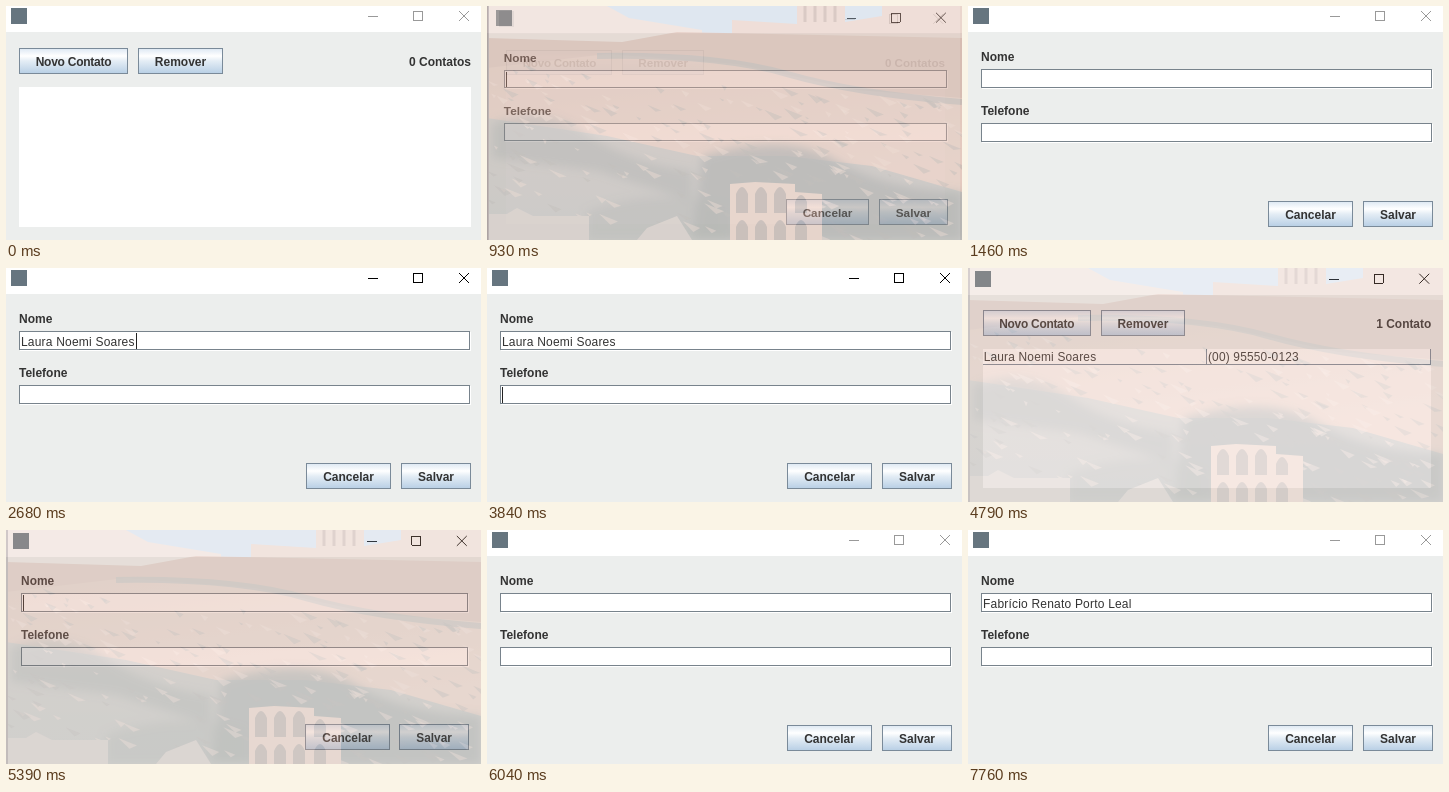
An HTML page that plays this animation: 475x234 px, repeating every 8000 ms.

```html
<!DOCTYPE html>
<html lang="pt-BR">
<head>
<meta charset="utf-8">
<title>Contatos</title>
<style>
  html, body { margin: 0; width: 100%; height: 100%; overflow: hidden; background: #eceeed; }
  svg { display: block; width: 475px; height: 234px; }
  text { font: 12px "Liberation Sans", Arial, sans-serif; letter-spacing: .2px; fill: #333; white-space: pre; }
  .b { font-weight: bold; letter-spacing: 0; }
  .tight { letter-spacing: -.25px; }
  .mid { text-anchor: middle; }
  .end { text-anchor: end; }
  .win { transform-origin: 230px 106px; }
  .ctl { fill: none; stroke: #999; }
  .active .ctl { stroke: #000; }
  .crisp { shape-rendering: crispEdges; }
</style>
</head>
<body>
<svg id="stage" viewBox="0 0 475 234">
  <defs>
    <linearGradient id="btn" x2="0" y2="1">
      <stop offset="0" stop-color="#dde8f3"/>
      <stop offset=".3" stop-color="#fff"/>
      <stop offset=".5" stop-color="#e4edf5"/>
      <stop offset="1" stop-color="#b8cfe5"/>
    </linearGradient>
    <linearGradient id="rock" x2=".4" y2="1">
      <stop offset="0" stop-color="#c88a72"/>
      <stop offset="1" stop-color="#dc9f87"/>
    </linearGradient>
    <linearGradient id="ground" x2="0" y2="1">
      <stop offset="0" stop-color="#b08c7d"/>
      <stop offset="1" stop-color="#8d8680"/>
    </linearGradient>
    <filter id="soft"><feGaussianBlur stdDeviation="5"/></filter>
  </defs>
  <g id="wall">
    <rect width="475" height="234" fill="url(#ground)"/>
    <rect width="475" height="40" fill="#a3b9d4"/>
    <path d="M0 0H120L142 12L215 24V40H0Z" fill="#d9b8aa"/>
    <path d="M245 30V14L310 18V0H358V16L395 10V0H475V40H245Z" fill="#d0a28f"/>
    <path d="M318 0V16M328 0V16M338 0V16M348 0V16" stroke="#94685a" stroke-width="3"/>
    <path d="M0 32L135 36L190 26L475 32V100H0Z" fill="#bd7f69"/>
    <path d="M0 62L120 48L250 58L370 84L475 92V186L385 160L300 150L210 150L120 130L0 112Z" fill="url(#rock)"/>
    <path d="M110 50Q230 48 300 68T475 96" fill="none" stroke="#756b67" stroke-width="6" opacity=".6"/>
    <g fill="#55534f" filter="url(#soft)">
      <path d="M215 150Q300 125 350 155T475 186V234H205Z" opacity=".75"/>
      <path d="M5 118Q55 98 100 128T205 165V195L110 165L5 152Z" opacity=".55"/>
      <path d="M100 205Q170 180 240 200V234H100Z" opacity=".4"/>
    </g>
    <g id="specks"></g>
    <path d="M0 208H20L30 202L46 210H102V234H0ZM160 222L190 210L205 234H150Z" fill="#b59d92"/>
    <path d="M243 234V178L268 176L308 178V186L335 188V234Z" fill="#dda58e"/>
    <path id="arches" fill="#8a6a5f"/>
    <rect width="2" height="234" fill="#5f4545"/>
  </g>
  <g id="wins"></g>
</svg>
<script>
const LOOP = 8000;
const CONTACT = 'Laura Noemi Soares', SECOND = 'Fabrício Renato Porto Leal', PHONE = '(00) 95550-0123';
const $ = id => document.getElementById(id);

const rect = (x, y, w, h, fill, extra = '') =>
  `<rect class="crisp" x="${x}" y="${y}" width="${w}" height="${h}" fill="${fill}" ${extra}/>`;
const text = (x, y, s, cls = '', id = '') =>
  `<text x="${x}" y="${y}" class="${cls}" ${id && `id="${id}"`}>${s}</text>`;
const button = (x, y, w, label, cls = '') =>
  rect(x + .5, y + .5, w - 1, 25, 'url(#btn)', `stroke="#7a8a99" id="${label}"`) +
  text(x + w / 2, y + 18, label, 'b mid ' + cls);
const field = (y, label, id) =>
  text(13, y - 8, label, 'b') + rect(14, y + 1, 451, 19, '#fff') +
  rect(13.5, y + .5, 450, 18, '#fff', 'stroke="#78838c"') + text(15, y + 15, '', '', id);
// The window reaches a little past the visible stage
const frame = (id, body) => `<g class="win" id="${id}">
  ${rect(-6, 26, 487, 214, '#eceeed')}${rect(-6, -6, 487, 32, '#fff')}${rect(5, 2, 16, 16, '#66757f')}
  <path class="ctl crisp" d="M362 10.5H372M407.5 5.5H416.5V14.5H407.5Z"/>
  <path class="ctl" d="M453 5L463 15M463 5L453 15"/>${body}</g>`;

$('wins').innerHTML =
  frame('form',
    field(63, 'Nome', 'name') + field(117, 'Telefone', 'phone') +
    button(300, 195, 85, 'Cancelar') + button(395, 195, 70, 'Salvar') +
    rect(0, 0, 1, 16, '#222', 'id="caret"')) +
  frame('list',
    button(13, 42, 109, 'Novo Contato', 'tight') + button(132, 42, 85, 'Remover') +
    text(465, 60, '', 'b end', 'count') + rect(13, 81, 452, 140, '#fff') +
    `<g id="row">${text(14, 93, CONTACT)}${text(240, 93, PHONE)}
      <path class="crisp" fill="none" d="M13 96.5H465M238.5 81V97M464.5 81V97" stroke="#7a8a99"/></g>`);

// Wallpaper details: rock cracks and scrub that follow the slope
let seed = 7;
const rnd = () => (seed = seed * 16807 % 2147483647) / 2147483647;
let specks = '';
for (let i = 0; i < 260; i++) {
  const x = rnd() * 470, y = 55 + rnd() * 150 + x * .08, w = 4 + rnd() * 16;
  const fill = i % 2 ? '#e9b9a4' : '#6f625c';
  specks += `<path d="M${x} ${y}l${w} ${w * .4}l${-w * .4} ${1 + rnd() * 3}z" fill="${fill}" opacity=".45"/>`;
}
$('specks').innerHTML = specks;
$('arches').setAttribute('d', [249, 268, 287, 308].map((x, i) => {
  const y = i < 3 ? 188 : 196;
  return `M${x} 207V${y}q6 -14 12 0V207ZM${x} 234V221q6 -14 12 0V234Z`;
}).join(''));

// Hard changes: [time, value]
const ACTIVE = [[0, 0], [750, 1], [1460, 0], [2530, 1], [3110, 0], [3840, 1], [6040, 0], [7040, 1], [7760, 0]];
const NAME = [[0, ''], [2680, CONTACT], [5000, ''], [7190, SECOND]];
const TEL = [[0, ''], [4000, PHONE], [5000, '']];
const SAVE_FILL = [[0, 'url(#btn)'], [4530, '#b8cfe5'], [5000, 'url(#btn)']];
const CARET = [[0, 0], [750, [15, 65]], [1190, 0], [2530, [15, 65]], [2680, [130, 65]], [2940, 0],
  [3840, [15, 119]], [4000, [107, 119]], [4270, 0], [5000, [15, 65]], [5620, 0],
  [5890, [15, 65]], [6040, 0], [7040, [15, 65]], [7190, [164, 65]], [7460, 0], [7740, [164, 65]], [7760, 0]];
const at = (table, t) => table.findLast(s => s[0] <= t)[1];

// Window fades: [window, opens, start, duration]
const FADES = [['list', 0, 750, 230], ['form', 1, 820, 200], ['form', 0, 4530, 160],
  ['list', 1, 4530, 350], ['list', 0, 5240, 140], ['form', 1, 5250, 200]];

function place(id, t) {
  let alpha = id === 'list' ? 1 : 0, scale = 1;
  for (const [win, opens, start, dur] of FADES) {
    if (win !== id || t < start) continue;
    const p = Math.min(1, (t - start) / dur);
    alpha = opens ? p : 1 - p;
    scale = opens ? 1 - .06 * (1 - p) ** 1.5 : 1 - .038 * p;
  }
  const el = $(id);
  el.style.opacity = alpha;
  el.style.visibility = alpha ? 'visible' : 'hidden';
  el.style.transform = scale === 1 ? 'none' : `scale(${scale})`;
}

function setText(id, s) {
  if ($(id).textContent !== s) $(id).textContent = s;
}

const wins = $('wins');
function draw(t) {
  const saved = t >= 4500;
  const front = saved && t < 5240 ? 'list' : 'form';
  if (wins.lastElementChild.id !== front) wins.append($(front));
  wins.classList.toggle('active', !!at(ACTIVE, t));
  setText('name', at(NAME, t));
  setText('phone', at(TEL, t));
  setText('count', saved ? '1 Contato' : '0 Contatos');
  $('row').style.display = saved ? '' : 'none';
  $('Salvar').setAttribute('fill', at(SAVE_FILL, t));
  const c = at(CARET, t), caret = $('caret');
  caret.style.display = c ? '' : 'none';
  if (c) {
    caret.setAttribute('x', c[0]);
    caret.setAttribute('y', c[1]);
  }
  place('list', t);
  place('form', t);
}

const t0 = performance.now();
function tick() {
  draw((performance.now() - t0) % LOOP);
  requestAnimationFrame(tick);
}
tick();
</script>
</body>
</html>
```
